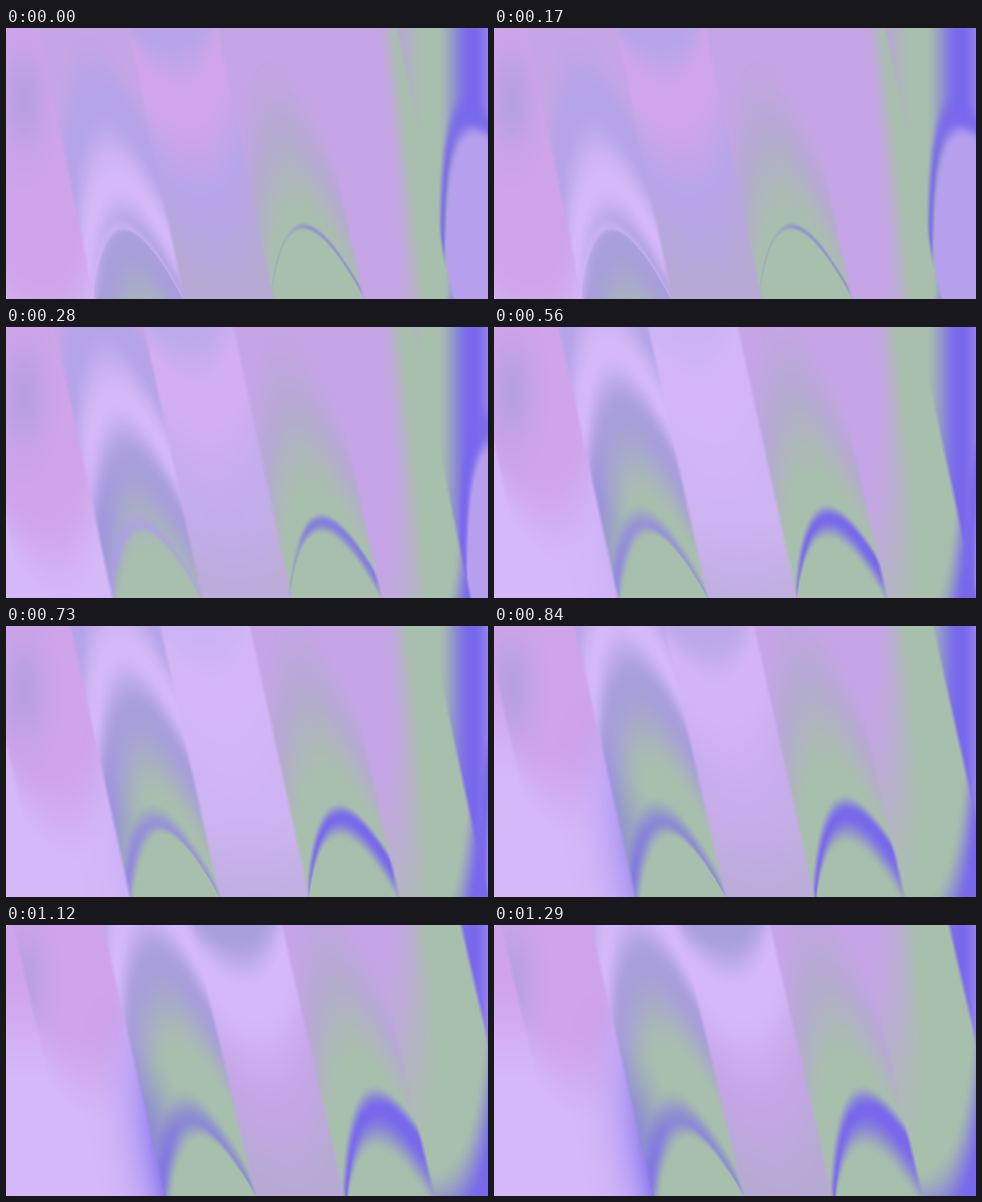
An HTML page with a canvas that plays this animation: 600 px wide and 338 px high, repeating every 1400 ms.

```html
<!DOCTYPE html>
<html lang="en">
<head>
<meta charset="utf-8">
<title>Flowing gradient</title>
<style>
  html, body { margin: 0; width: 100%; height: 100%; overflow: hidden; background: #c0a8e6; }
  canvas { display: block; width: 100%; height: 100%; }
</style>
</head>
<body>
<canvas id="stage" width="600" height="338"></canvas>
<script>
const canvas = document.getElementById('stage');
const ctx = canvas.getContext('2d');
const { width: W, height: H } = canvas;
const STEP = 280, POSES = 5, DRIFT = 20, PANE = 111.5;

const rgb = hex => [1, 3, 5].map(i => parseInt(hex.slice(i, i + 2), 16));
const PINK = rgb('#d0a4ea'), LIGHT = rgb('#d4b8f8'), GREEN = rgb('#a9bfad');
const BLUE = rgb('#7868ec'), DUSK = rgb('#a79eda'), MAUVE = rgb('#c5a5e6');
const LILAC = rgb('#b5a4e8'), ASH = rgb('#b5a9d2'), INNER = rgb('#b6a0ee');

const clamp = t => Math.max(0, Math.min(1, t));
const smooth = (a, b, v) => { const t = clamp((v - a) / (b - a)); return t * t * (3 - 2 * t); };
const bell = t => Math.exp(-t * t);
const mix = (a, b, t) => [a[0] + (b[0] - a[0]) * t, a[1] + (b[1] - a[1]) * t, a[2] + (b[2] - a[2]) * t];

// Soft bands of colour, each change centred between two levels.
const ramp = (v, first, ...bands) => {
  let color = first;
  for (const [from, to, next] of bands) color = mix(color, next, smooth(from, to, v));
  return color;
};

// Bands inside a pane scroll upward, slowing down.
const rise = k => 260 * (1 - Math.exp(-k / 2));
const bow = (u, centre) => ((u - centre) * 2) ** 2;

// Blue rim along a dome; lean makes it swell to the right (+) or left (-).
const rim = (depth, u, thick, lean, soft) => {
  const t = thick * Math.max(.25, 1 + lean * (2 * u - 1));
  return smooth(-soft, soft * .4, depth) * (1 - smooth(t * .3, t * 1.7, depth));
};

// Each painter gets u across its pane, screen x and y, and pose k.
const painters = {
  '-1': (u, x, y) => ramp(y, PINK, [60, 200, LIGHT]),

  0(u, x, y, k) {
    const h = y + 55 * bow(u, .45) + .8 * rise(k);
    const color = mix(ramp(h, PINK, [310, 430, LIGHT]), DUSK,
      .6 * bell((x - 22) / 28) * bell((y - 90 + 5 * k) / 65));
    const leak = u ** 4 * smooth(60, 338, y) * smooth(1.5, 4, k);
    return mix(color, BLUE, .75 * leak);
  },

  1(u, x, y, k) {
    const h = y - 95 * bow(u, .52) + rise(k);
    const color = ramp(h, MAUVE, [-10, 90, LILAC], [100, 185, LIGHT], [195, 270, DUSK], [270, 390, GREEN]);
    const depth = y - 246 + 3 * k - 85 * bow(u, .47);
    const side = mix(color, BLUE, .55 * k / 4 * smooth(120, 260, y) * (1 - smooth(0, .45, u)));
    const edge = mix(LIGHT, BLUE, clamp(k / 2.5));
    return mix(mix(side, color, smooth(0, 45, depth)), edge, .65 * rim(depth, u, 5 + 4 * k, -.8, 14 + 5 * k));
  },

  2(u, x, y, k) {
    const h = y + 50 * bow(u, .45);
    const color = ramp(h, mix(LILAC, DUSK, k / 4),
      [15, 80, mix(PINK, LIGHT, k / 4)], [105, 230, mix(LILAC, MAUVE, k / 4)], [200, 360, ASH]);
    return mix(color, LIGHT, .8 * bell((k - 2) / 1.2) * (1 - .5 * smooth(220, 338, y)));
  },

  3(u, x, y, k) {
    const h = y - 100 * bow(u, .48) + .3 * rise(k);
    const color = ramp(h, MAUVE, [20, 150, ASH], [110, 245, GREEN]);
    const centre = .5 + .03 * k;
    const depth = y - 246 + 7 * k - 80 * bow(u, centre);
    const right = .45 + .55 * smooth(.3, .6, u + k / 5);
    return mix(mix(color, GREEN, .7 * smooth(0, 30, depth)), BLUE,
      right * (.5 + .5 * clamp(k / 2)) * rim(depth, u, 4 + 8 * k, .8, 6 + 4 * k));
  },

  4(u, x, y, k) {
    const level = 640 * Math.exp(-k / 4);
    const color = ramp(y + 700 * u * u, MAUVE, [level - 220, level + 60, GREEN]);
    const reach = 520 - 43 * k;
    return mix(color, BLUE, smooth(reach - 45, reach + 35, y + 180 * u * u));
  },

  5(u, x, y, k) {
    const color = ramp(x, ASH, [485, 522, GREEN], [535, 578, BLUE], [582, 618, INNER]);
    const depth = y - 100 - 15 * k - 110 * bow(u, .62);
    const shade = mix(color, INNER, smooth(8, 40, depth));
    return mix(shade, BLUE, .9 * rim(depth, u, 18 + 8 * k, 0, 24));
  }
};

function render(k) {
  const image = ctx.createImageData(W, H);
  const lean = (70 + 2 * k) / H;
  for (let y = 0, at = 0; y < H; y++) {
    for (let x = 0; x < W; x++, at += 4) {
      const across = (x - 40 - DRIFT * k - lean * y) / PANE + 1;
      const i = Math.max(-1, Math.min(5, Math.floor(across))), u = across - i;
      let color = painters[i](u, x, y, k);
      const blend = .5 - u * PANE / 5;
      if (blend > 0 && i > -1) color = mix(color, painters[i - 1](u + 1, x, y, k), blend);
      const past = .5 - (1 - u) * PANE / 5;
      if (past > 0 && i < 5) color = mix(color, painters[i + 1](u - 1, x, y, k), past);
      image.data.set(color, at);
      image.data[at + 3] = 255;
    }
  }
  return image;
}

const images = [];
let shown = -1;
const start = performance.now();
function frame(now) {
  const pose = Math.floor(Math.max(0, now - start) / STEP) % POSES;
  if (pose !== shown) {
    shown = pose;
    ctx.putImageData(images[pose] ||= render(pose), 0, 0);
  }
  requestAnimationFrame(frame);
}
frame(start);
</script>
</body>
</html>
```
